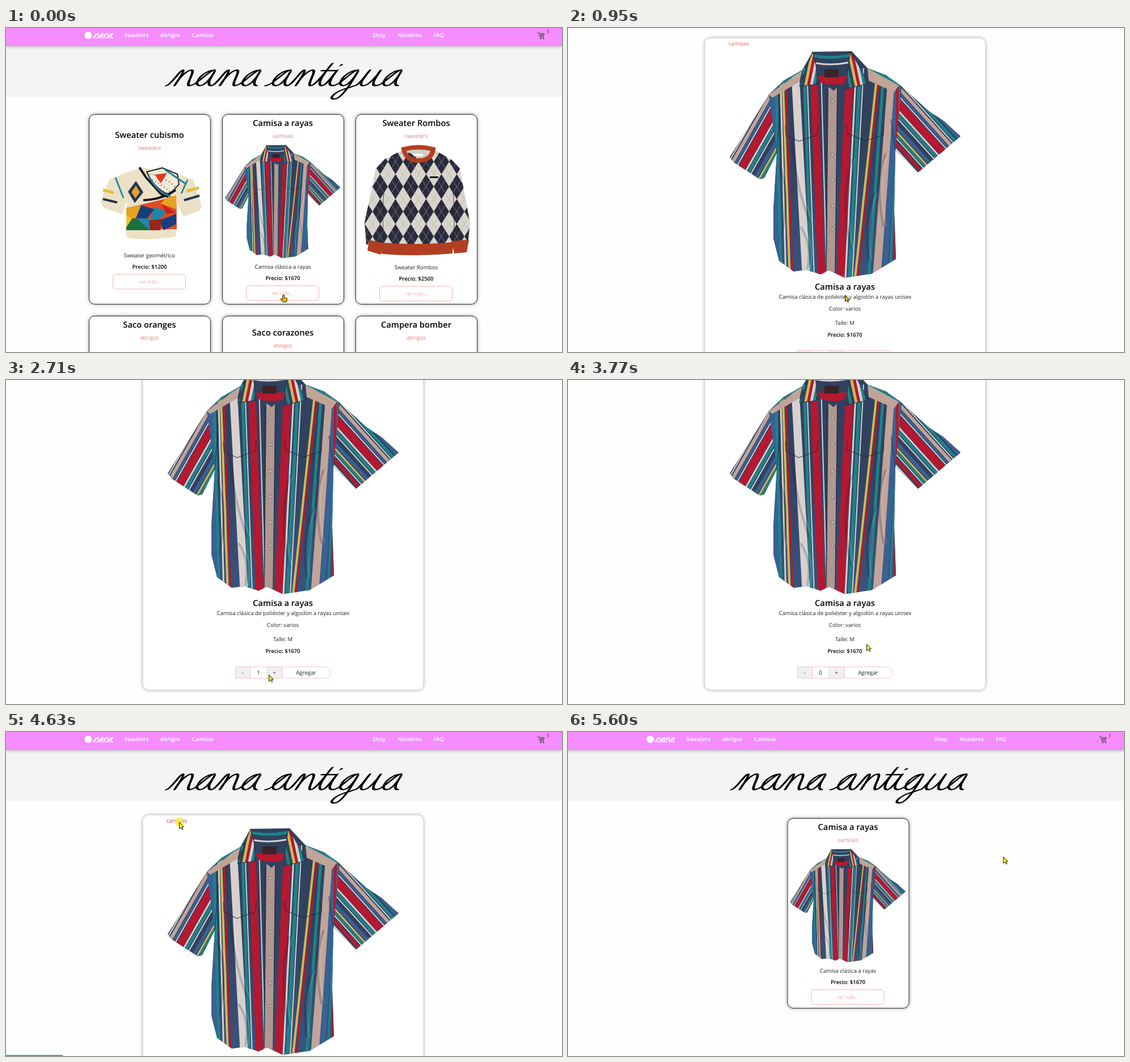
Animation, 980 px wide and 572 px high, one loop 5730 ms. Source, as an HTML page:

```html
<!DOCTYPE html>
<html lang="es">
<head>
<meta charset="utf-8">
<title>nana antigua</title>
<style>
  html, body { margin: 0; width: 100%; height: 100%; overflow: hidden; background: #fefefe; }
  svg { display: block; width: 980px; height: 572px; }
  text { font-family: "Open Sans", "Noto Sans", sans-serif; text-rendering: geometricPrecision; }
  .shadow { filter: drop-shadow(0 0 3px #0006); }
</style>
</head>
<body>
<svg id="stage" viewBox="0 0 980 572"></svg>
<script>
const C = { navy: '#30425f', blue: '#3a6094', red: '#b51830', tan: '#c0a498', teal: '#1d8389',
            yellow: '#d3b951', white: '#d9d0ce', cream: '#ece1c6', rust: '#b23e22' };

const text = (x, y, label, size = 9.7, fill = '#222', weight = 400, extra = '') =>
  `<text x="${x}" y="${y}" font-size="${size}" fill="${fill}" font-weight="${weight}" text-anchor="middle" ${extra}>${label}</text>`;
const shape = (d, fill, extra = '') => `<path d="${d}" fill="${fill}" ${extra}/>`;
const line = (d, stroke, width, extra = '') =>
  `<path d="${d}" fill="none" stroke="${stroke}" stroke-width="${width}" ${extra}/>`;
const rect = (x, y, w, h, fill, extra = '') =>
  `<rect x="${x}" y="${y}" width="${w}" height="${h}" fill="${fill}" ${extra}/>`;

// Cursive lettering: every glyph starts and ends on the baseline.
const bowl = 'c10 0 16-28 24-28c-10 0-16 10-16 18c0 8 4 10 7 10c7 0 10-16 10-26';
const glyphs = {
  n: [33, 'c6 0 8-28 12-28c4 0 0 28 0 28c0-14 6-28 12-28c7 0 2 28 9 28'],
  a: [31, bowl + 'c-1 12-2 26 6 26'],
  t: [16, 'c8 0 12-38 14-40c-4 14-8 40 2 40', [4, -27, 'h20']],
  i: [15, 'c6 0 8-24 10-28c-3 14-4 28 5 28', [11, -36, 'l1-2']],
  g: [31, bowl + 'c-1 20-2 48-12 50c-10 1-6-12 6-18c6-2 8-4 12-6'],
  u: [30, 'c6 0 8-24 10-28c-3 14-6 28 2 28c8 0 12-18 13-28c-1 14-4 28 5 28'],
  ' ': [12, '']
};
function lettering(word) {
  let x = 0, d = '';
  for (const ch of word) {
    const [width, stroke, mark] = glyphs[ch];
    if (stroke) d += `M${x} 0${stroke}`;
    if (mark) d += `M${x + mark[0]} ${mark[1]}${mark[2]}`;
    x += width;
  }
  return d;
}
const script = (word, transform, color, width, nib) =>
  `<g transform="${transform}" stroke-linecap="round" stroke-linejoin="round" role="img" aria-label="${word}">` +
  [0, 1, 2].map(i => line(lettering(word), color, width, `transform="translate(${i * nib} ${-i * nib * .3})"`)).join('') + '</g>';

// Striped shirt
const bodyStripes = [
  [358, 366, 14, 'blue'], [366, 376, 5, 'teal'], [374, 384, 3, 'white'], [378, 391, 4, 'yellow'], [383, 396, 3, 'red'],
  [400, 420, 14, 'white'], [416, 429, 5, 'teal'], [421, 434, 2, 'white'], [433, 447, 13, 'red'], [446, 456, 2, 'white'],
  [497, 480, 14, 'red'], [508, 489, 3, 'white'], [515, 496, 6, 'teal'], [521, 501, 2, 'white'],
  [546, 506, 4, 'yellow'], [551, 511, 3, 'red'], [557, 530, 5, 'teal'], [572, 544, 14, 'tan'],
  [582, 557, 10, 'blue'], [586, 567, 4, 'teal'], [581, 577, 5, 'red']];
const sleeveStripes = [[-16, 6, 'blue'], [-8, 5, 'teal'], [-3, 2, 'white'], [3, 6, 'tan'], [9, 4, 'blue'], [13, 2, 'white'],
  [22, 13, 'red'], [31, 3, 'white'], [36, 5, 'teal'], [41, 2, 'white'], [52, 6, 'blue'], [58, 3, 'yellow'],
  [62, 4, 'teal'], [66, 2, 'white'], [72, 6, 'red'], [80, 4, 'white'], [87, 6, 'blue']];
const bodyPath = 'M431 171L413 203 380 222 354 247 368 350 362 450 362 500 372 540 398 559 420 556 445 564 460 557 488 570 535 563 578 537 575 450 577 345 588 232 560 212 528 200 500 170Z';
const leftSleeve = 'M380 222L354 247 285 357 292 366 338 396 346 394 368 350 374 270Z';
const rightSleeve = 'M560 212L588 232 635 275 662 293 692 320 617 384 577 345 569 290Z';
const leftCollar = 'M431 171L408 232 440 228 437 195Z';
const rightCollar = 'M498 170L530 227 489 237 494 195Z';
const clip = (id, d) => `<clipPath id="${id}"><path d="${d}"/></clipPath>`;
const clipped = (id, content) => `<g clip-path="url(#${id})">${content}</g>`;
const sleeve = (id, transform) => clipped(id, rect(270, 160, 440, 260, C.navy) + `<g transform="${transform}">` +
  sleeveStripes.map(([x, w, c]) => line(`M${x}-50V190`, C[c], w)).join('') + '</g>');
const collarStripes = (x, lean) => ['teal', 'navy', 'yellow', 'red', 'white', 'teal', 'navy']
  .map((c, i) => line(`M${x + i * 5} 165l${lean} 80`, C[c], 5)).join('');
const folds = 'M372 370Q392 420 376 500M395 330Q400 400 425 470M500 360Q480 430 498 520M560 350Q540 400 556 480M540 420Q520 470 530 540M410 480Q430 510 422 555';
const shirt =
  `<defs>${clip('body', bodyPath)}${clip('sleeveL', leftSleeve)}${clip('sleeveR', rightSleeve)}${clip('collarL', leftCollar)}${clip('collarR', rightCollar)}
  <linearGradient id="denim" x2="0" y2="1"><stop stop-color="${C.navy}"/><stop offset=".45" stop-color="${C.navy}"/><stop offset="1" stop-color="#38557f"/></linearGradient></defs>` +
  sleeve('sleeveL', 'translate(354 247) rotate(29.5)') +
  sleeve('sleeveR', 'translate(585 232) rotate(-42) scale(-1 1)') +
  clipped('body', rect(350, 165, 245, 410, 'url(#denim)') +
    bodyStripes.map(([top, bottom, w, c]) => line(`M${top} 200L${bottom} 570`, C[c], w)).join('') +
    shape('M354 247L413 203 408 224 360 252ZM528 200L585 228 575 242 530 222Z', C.tan) +
    line('M356 240L412 202M530 199L588 231', C.teal, 4) +
    shape('M459 234L474 234 471 560 456 560Z', '#b09890') +
    line('M475 236L471 560M457 238L455 558', '#26304a', 1.5) +
    line(folds, '#101c34', 4, 'opacity=".2"') +
    line(folds, '#fff', 2, 'opacity=".15" transform="translate(5 0)"')) +
  shape('M431 171Q465 178 498 170L496 214 468 240 438 214Z', C.navy) +
  line('M434 178Q465 184 497 177', C.teal, 5) + line('M437 191Q465 196 494 190', C.white, 3) +
  shape('M439 214H494L486 227Q467 232 446 226Z', C.red) + rect(452, 202, 25, 14, '#3a2426') +
  clipped('collarL', rect(400, 165, 45, 75, C.navy) + collarStripes(422, -16)) +
  clipped('collarR', rect(485, 165, 50, 75, C.navy) + collarStripes(484, 17)) +
  line(leftCollar + rightCollar, '#26304a', 1) +
  line('M383 300L384 318 407 329 440 317 441 298M491 297L492 315 524 328 556 318V302M368 350L374 270M577 345L569 290', '#1c2638', 1.2, 'opacity=".7"') +
  [258, 306, 353, 398, 443, 484].map(y => `<circle cx="466" cy="${y}" r="3" fill="#c4b2aa" stroke="#80706c"/>`).join('');

const cubist =
  shape('M240 246Q256 252 272 244L302 257 330 268 345 315 340 323 313 333 303 312 299 368 Q256 376 218 371L211 367 213 305 205 329 173 318 166 306 182 268 212 255Z', C.cream) +
  shape('M212 318L238 312 275 303 300 296 301 355 212 357Z', '#df4a23') +
  shape('M212 317L238 313 230 335 212 337ZM285 298L300 296V320L272 310Z', '#e7a220') +
  shape('M238 313L262 320 248 337 229 336ZM270 340L300 328V346L278 357Z', '#173f7d') +
  shape('M212 338L230 336 254 357H212Z', '#19713b') + shape('M230 336L260 337 254 357ZM262 316L284 324 268 341 255 335Z', '#2386a6') +
  shape('M252 340L275 337 272 357H254Z', '#9b241d') + shape('M274 310L299 326 283 328Z', '#c91f22') +
  shape('M212 330L222 337 212 352Z', '#e9c530') +
  shape('M248 254L276 247 302 258 305 276 288 294Q262 285 248 254Z', '#f1ead8', 'stroke="#222" stroke-width="2"') +
  line('M254 258Q280 262 300 282M258 268Q276 278 289 289', '#222', 1.6, 'stroke-dasharray=".1 6" stroke-linecap="round"') +
  shape('M262 259L284 256 273 274Z', '#e33a22') +
  line('M235 246L247 264 273 293 286 298M242 304Q275 303 299 286', '#17191d', 4) + line('M252 262Q266 290 290 297M280 250L318 276', '#247f9c', 3) +
  shape('M229 270L242 290 227 309 215 289Z', '#253456') + shape('M229 278L236 290 228 301 221 290Z', '#e5a02c') +
  line('M171 286L190 291M318 288L340 282', '#e3bd3e', 5) + line('M171 302L196 308M314 304L341 296', '#26334f', 4) +
  line('M193 264L207 300M320 268L309 292', '#2c8a9d', 3);

const argyle =
  `<defs><pattern id="diamonds" x="700" y="214" width="27" height="44" patternUnits="userSpaceOnUse">
    <path d="M0 0H27V44H0Z" fill="#d9d5cd"/><path d="M13.5 0L27 22 13.5 44 0 22Z" fill="#292b3b"/>
    <path d="M0 0L27 44M27 0L0 44" stroke="#aaa6a4" stroke-width=".6"/></pattern></defs>` +
  shape('M698 216L668 231 652 248 632 343 635 382 665 389 790 389 814 382 818 345 800 248 786 233 757 216Z', 'url(#diamonds)') +
  shape('M640 374L667 380V392L660 400 637 393ZM785 376L816 374 812 396 790 398ZM664 379Q726 384 788 378L787 398Q726 404 663 399Z', C.rust) +
  line('M666 378Q662 320 667 282M789 377Q792 320 787 282', '#26242c', 1.2, 'opacity=".7"') +
  shape('M705 216Q727 208 750 216 749 230 727 231 706 230Z', '#d2cdc6') +
  line('M701 214Q727 207 753 214Q750 234 727 234Q705 234 701 214Z', C.rust, 8) + rect(718, 222, 17, 4, '#f7f7f7') + rect(747, 262, 15, 3, '#111');

const frame = (x, y) => rect(x + .5, y + .5, 214, 335, '#fff', 'rx="10" stroke="#222" class="shadow"');
const heading = (x, y, title, category) =>
  text(x, y, title, 14.7, '#000', 600) + text(x, y + 21, category, 9.7, '#ee7874', 500);
function card(x, titleY, descY, title, category, description, price, picture) {
  const mid = x + 107;
  return frame(x, 152) + heading(mid, titleY, title, category) + picture +
    text(mid, descY, description) + text(mid, descY + 20, `Precio: $${price}`, 9.6, '#000', 600) +
    rect(mid - 64.5, descY + 30, 128, 26, '#fff', 'rx="5" stroke="#f5b0b0"') + text(mid, descY + 46, 'ver más...', 8.5, '#f2a09c', 500);
}
const shirtCard = card(381, 173, 425, 'Camisa a rayas', 'camisas', 'Camisa clásica a rayas', 1670,
  '<use href="#shirt" transform="translate(243.5 121.5) scale(.5)"/>');

const home =
  card(146, 194, 405, 'Sweater cubismo', 'sweaters', 'Sweater geométrico', 1200, cubist) + shirtCard +
  card(616, 173, 426, 'Sweater Rombos', 'sweaters', 'Sweater Rombos', 2500, argyle) +
  [146, 381, 616].map(x => frame(x, 508)).join('') +
  heading(253, 529, 'Saco oranges', 'abrigos') + heading(488, 543, 'Saco corazones', 'abrigos') + heading(723, 529, 'Campera bomber', 'abrigos');

const pink = 'stroke="#f9c3cd"';
const detail =
  rect(241.5, 147, 494, 592, '#fff', 'rx="10" class="shadow"') +
  text(301, 160, 'camisas', 9.7, '#e0645f', 500, 'id="category"') + '<use href="#shirt"/>' +
  text(488, 591, 'Camisa a rayas', 14.7, '#000', 600) +
  text(488.5, 607, 'Camisa clásica de poliéster y algodón a rayas unisex') +
  text(488, 628, 'Color: varios') + text(488, 653, 'Talle: M') + text(488, 674, 'Precio: $1670', 9.6, '#000', 600) +
  rect(404.5, 698.5, 26, 20, '#f0f0f0', pink) + rect(430.5, 698.5, 30, 20, '#fff', pink) + rect(460.5, 698.5, 26, 20, '#f0f0f0', pink) +
  rect(486.5, 698.5, 85, 20, '#fff', 'rx="8" ' + pink) +
  text(417, 712, '-') + text(445, 712, '0', 9.7, '#222', 400, 'id="count"') + text(473, 712, '+') + text(529, 712, 'Agregar', 9.8);

const links = [['Sweaters', 230], ['Abrigos', 289.5], ['Camisas', 347], ['Shop', 657.5], ['Nosotros', 711.5], ['FAQ', 763]];
const header =
  rect(0, 32, 980, 89.5, '#f4f4f4') + rect(0, -10, 980, 42, '#f58dff', 'class="shadow"') +
  '<circle cx="145" cy="13" r="6.5" fill="#fff"/>' + script('nana', 'translate(153 16) skewX(-25) scale(.26 .23)', '#fff', 3, 1) +
  line('M153 17.5H189', '#fff', 1) + links.map(([label, x]) => text(x, 16, label, 9.6, '#fff', 600)).join('') +
  line('M936 7.5h2.5l3 9h6.5M939 9.5h10l-1.5 5h-7M940 12h8.5M943 9.5v5M946 9.5v5', '#555', 1) +
  '<circle cx="942.5" cy="18.5" r="1.2" fill="#444"/><circle cx="947.5" cy="18.5" r="1.2" fill="#444"/>' +
  text(955, 10, '1', 9, '#c8104c', 600) +
  `<g id="brand">${script('nana antigua', 'translate(281 102) skewX(-28) scale(1.25 .98)', '#000', 1.7, .8)}</g>`;

document.getElementById('stage').innerHTML =
  `<defs><g id="shirt">${shirt}</g></defs><rect width="980" height="572" fill="#fefefe"/>
  <g id="page">${header}<g id="home">${home}</g><g id="loading">${text(493.5, 164, 'cargando...', 14.6, '#333', 700)}</g>
  <g id="detail">${detail}</g><g id="filtered" transform="translate(5.5 0)">${shirtCard}</g></g>
  ${rect(0, 570, 100, 2, '#45ab9e', 'id="status"')}
  <g id="cursor"><circle id="click" r="8" fill="#ffe93b" opacity=".75"/>
  <path id="arrow" d="M.5 .5V12L3.2 9.5 5.2 13.3 6.9 12.4 5 8.7H8.3Z" stroke="#222"/>
  <path id="hand" d="M.5 0Q2 -1 2.5 .5V5L6.5 5.5Q8 6 7.5 8.5L6.5 13H0L-4 8Q-4 6 -2 7L-.5 8V1Z" fill="#e3b112" stroke="#3a2c08"/></g>`;

const el = id => document.getElementById(id);
const show = (id, visible) => el(id).style.display = visible ? '' : 'none';
const within = (t, ...ranges) => ranges.some(([from, to]) => t >= from && t < to);

const LOOP = 5730;
const scenes = [[0, 'home'], [200, 'loading'], [410, 'blank'], [550, 'detail'], [4900, 'loading'], [5320, 'blank'], [5600, 'filtered']];
const scrolls = [[0, 0], [950, 129], [1160, 192], [3840, 129], [3980, 0]];
const pointer = [[0, 488, 471], [1290, 488, 471], [1640, 477, 508], [1920, 475, 518], [2120, 475, 518], [2640, 469, 520],
  [3230, 420, 521], [3300, 420, 521], [3770, 526, 466], [3910, 526, 466], [4490, 305, 159], [4700, 305, 159],
  [5110, 746, 192], [5390, 767, 220], [LOOP, 767, 220]];
const current = (steps, t) => steps.filter(([start]) => t >= start).pop()[1];

function pointerAt(t) {
  const i = pointer.findIndex(([time]) => time > t);
  const [t0, x0, y0] = pointer[i - 1], [t1, x1, y1] = pointer[i];
  const k = (t - t0) / (t1 - t0);
  return [x0 + (x1 - x0) * k, y0 + (y1 - y0) * k].map(Math.round);
}

function draw(now) {
  const t = now % LOOP, scene = current(scenes, t);
  for (const id of ['home', 'loading', 'detail', 'filtered']) show(id, id === scene);
  // Short pages have no scrollbar, so centred content moves right.
  el('brand').setAttribute('transform', `translate(${scene === 'home' || scene === 'detail' ? 0 : 5.5} 0)`);
  el('page').setAttribute('transform', `translate(0 ${-current(scrolls, t)})`);
  el('count').textContent = within(t, [2190, 3300]) ? 1 : 0;
  el('category').setAttribute('fill', within(t, [4490, 4770]) ? '#b8385c' : '#e0645f');
  el('cursor').setAttribute('transform', `translate(${pointerAt(t).join(' ')})`);
  el('arrow').setAttribute('fill', t < 1360 ? '#d8bd10' : '#fff01a');
  show('hand', t < 200);
  show('arrow', t >= 200);
  show('click', within(t, [70, 200], [2120, 2260], [3160, 3300], [4560, 4730]));
  show('status', within(t, [70, 200], [4560, 4800]));
  requestAnimationFrame(draw);
}
requestAnimationFrame(draw);
</script>
</body>
</html>
```
